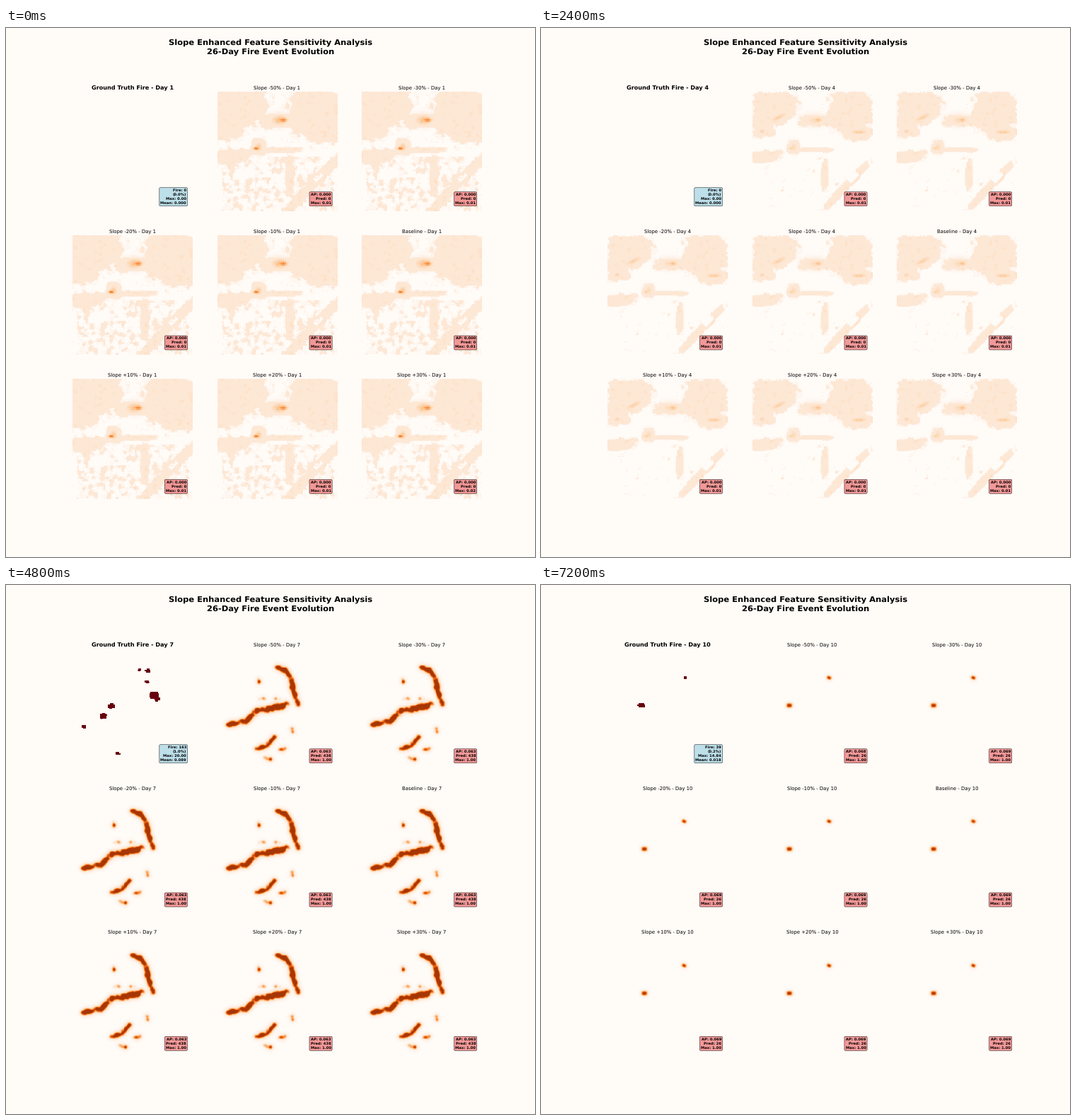
A matplotlib script that plays this animation: 748x748 px, repeating every 8 s.

```python
import matplotlib.pyplot as plt
import numpy as np
from matplotlib.animation import FuncAnimation
from matplotlib.colors import LinearSegmentedColormap, ListedColormap

plt.rcParams["font.family"] = "DejaVu Sans"
plt.rcParams["text.hinting"] = "none"

PAPER = "#fffbf7"
N = 128
SPAN = 169.4
DAYS = 10
rng = np.random.default_rng(7)
axis = (np.arange(N) + 0.5) * SPAN / N
X, Y = np.meshgrid(axis, axis)
COL, ROW = np.meshgrid(np.arange(N), np.arange(N))
DOTS = (COL % 2 == 0) & (ROW % 2 == 0)


def blur(a, n):
    a = np.asarray(a, float)
    for _ in range(n):
        p = np.pad(a, 1, mode="edge")
        a = (p[:-2, 1:-1] + p[2:, 1:-1] + p[1:-1, :-2] + p[1:-1, 2:] + 2 * a) / 6
    return a


def noise(n):
    a = blur(rng.standard_normal((N, N)), n)
    return a / a.std()


def union(*fields):
    return np.maximum.reduce(fields)


def spot(x, y, rx, ry=None, tilt=0, power=2):
    """Rounded bump that falls to one half at its radii."""
    t = np.radians(tilt)
    u = ((X - x) * np.cos(t) + (Y - y) * np.sin(t)) / rx
    v = ((Y - y) * np.cos(t) - (X - x) * np.sin(t)) / (ry or rx)
    return 0.5 ** (np.abs(u) ** power + np.abs(v) ** power)


def trail(radius, *points):
    """Band of even width along a polyline."""
    gap = np.full((N, N), np.inf)
    for (x0, y0), (x1, y1) in zip(points, points[1:]):
        dx, dy = x1 - x0, y1 - y0
        t = np.clip(((X - x0) * dx + (Y - y0) * dy) / (dx * dx + dy * dy), 0, 1)
        gap = np.minimum(gap, np.hypot(X - x0 - t * dx, Y - y0 - t * dy))
    return 0.5 ** ((gap / radius) ** 4)


def glow(field, reach, gain):
    return np.maximum(field, gain * blur(field, reach))


def cells(field, rough=0, cut=0.5):
    """Burning cells; roughness breaks the field into short dashes."""
    dash = noise(1) + 0.6 * noise(2)
    return (field + rough * dash * (field > 0.08) > cut).astype(float)


# Quiet days: one terrain whose risky part shrinks day by day
masses = [(32, 20, 31, 21, 0), (17, 48, 16, 18, 0), (44, 34, 22, 10, -38),
          (140, 28, 32, 32, 0), (92, 42, 28, 8, 0), (150, 60, 22, 11, 0),
          (18, 93, 22, 8, -8), (58, 79, 9, 10, 0), (88, 83, 26, 3.5, 0),
          (102, 118, 5, 22, 0), (134, 132, 46, 6, -46)]
land = union(*(spot(*mass, power=3) for mass in masses))
land *= 1 - spot(142, 122, 9, 4, -46, power=4)
terrain = land + 0.08 * noise(12) + 0.05 * noise(3)
scrub = noise(7)
south = (Y > 92) & (X > 6) & (X < 164)


def quiet(day):
    cut = min(0.5, 0.17 + 0.09 * day)
    soft = terrain + 0.03 * noise(3)
    inside = soft > cut
    shade = 0.14 + 0.035 * np.clip(noise(4) - 0.8, 0, 2)
    thin = 0.6 * day - 0.8
    fringe = DOTS & ((soft > cut - 0.13) | south & (scrub > thin))
    patch = south & (scrub > thin + 0.9)
    early, late = 5 - day, day - 1
    peaks = union(
        (0.72 - 0.08 * day) * spot(92, 41, 6, 3.5),
        (0.45 - 0.05 * day) * spot(88, 41, 11, 6.5),
        (0.24 + 0.13 * early) * spot(55, 81, 4, 2),
        (0.24 + 0.03 * early) * spot(58, 79, 5, 6),
        (0.2 + 0.04 * late) * spot(37, 37, 12, 3.5, -26),
        (0.2 + 0.05 * late) * spot(150, 58, 11, 3),
        (0.1 + 0.07 * late) * spot(14, 57, 4.5, 3))
    grain = 0.85 + 0.3 * DOTS + 0.05 * noise(1)
    return union(shade * (inside | patch), 0.12 * fringe, peaks * grain)


# Fire days: key paths of the burn
north = trail(3, (84, 27), (98, 33), (104, 45), (107, 60), (114, 80))
west = trail(4, (16, 108), (42, 102), (56, 88), (72, 86), (98, 80))
neck = trail(5.5, (78, 89), (79, 98))
streak = trail(3, (73, 148), (90, 130))
islet = spot(24, 108, 5.5, power=3)
body = spot(91, 58, 20, 28, power=3)

first_burn = union(
    spot(93, 58, 10, 27, power=6), 0.5 * spot(73, 55, 10, 20, power=4),
    0.42 * trail(3, (103, 45), (109, 72), (106, 118), (96, 154)),
    0.7 * trail(3, (91, 88), (75, 99)), 0.45 * trail(4, (84, 96), (82, 115)),
    0.8 * streak, spot(23, 108, 3.5, 2.8, power=4))
second_burn = union(
    north, 0.9 * west, 0.35 * trail(2, (60, 71), (90, 71)), 0.5 * spot(57, 48, 4, 5),
    0.95 * trail(3, (56, 142), (68, 138), (80, 126)), 0.6 * spot(91, 143, 4),
    0.7 * trail(2, (66, 155), (78, 157)), 0.5 * trail(2, (106, 110), (106, 121)))

spots = [(94, 31, 2.3), (106, 32, 3.4), (105, 48, 2.6), (115, 67, 6.5), (119, 72, 4),
         (55, 82, 4.6), (43, 96, 5.2), (16, 111, 3), (64, 149, 2.8)]


def embers(scale=1):
    return union(*(spot(x, y, r * scale, 0.75 * r * scale, power=3) for x, y, r in spots))


def smear(fire, gain):
    return glow(np.clip(blur(fire, 4) * gain, 0, 1), 12, 0.5)


flank = union(trail(7, (74, 40), (73, 44)), trail(6, (66, 46), (67, 47)),
              trail(6.5, (73, 54), (67, 66)), trail(4.5, (88, 35), (101, 36)))
cores = union(flank, neck, islet, 0.75 * spot(86, 98, 5, 4), 0.9 * spot(71, 81, 4, 3),
              0.95 * streak, 0.85 * spot(95, 129, 3.2), 0.6 * spot(95, 45, 14, 6))
haze = union(0.2 * body, 0.18 * spot(66, 27, 5, 6), 0.18 * spot(104, 112, 2, 10),
             0.17 * spot(101, 142, 8, 4, -30), 0.4 * body * DOTS)
crumbs = union(*(spot(*p, 2.2, 1.6) for p in rng.uniform((52, 122), (90, 148), (8, 2))))
link = trail(1.8, (86, 25), (94, 31), (104, 36), (105, 50), (113, 64))
last = union(spot(52, 81, 3.6, 2.7, power=3), 0.9 * spot(108, 42, 3, 2.3, 25, power=3))

truth = {
    5: cells(first_burn, 0.16),
    6: cells(second_burn, 0.22, 0.62),
    7: cells(embers(), 0.05),
    8: cells(embers(0.5)),
    9: cells(last),
    10: cells(union(spot(48, 81, 5.5, 2.6, power=3), spot(109, 42, 2, power=3))),
}
predicted = {day: quiet(day) for day in range(1, 6)}
predicted[6] = union(glow(cores, 10, 0.5) * (1 - 0.12 * DOTS), haze)
predicted[7] = smear(truth[6], 1.5)
predicted[8] = union(glow(embers(), 8, 0.45), 0.27 * link, 0.2 * crumbs,
                     0.28 * spot(37, 109, 5, 1.4), 0.35 * spot(84, 124, 2.4))
predicted[9] = smear(truth[8], 1.8)
predicted[10] = glow(last, 8, 0.5)

# Captions
SLOPES = ["Slope -50%", "Slope -30%", "Slope -20%", "Slope -10%", "Baseline",
          "Slope +10%", "Slope +20%", "Slope +30%"]
FIRE = {5: (1348, 8.2, 20, 1.024), 6: (766, 4.7, 20, 0.428), 7: (163, 1.0, 20, 0.089),
        8: (37, 0.2, 21, 0.017), 9: (28, 0.2, 15.5, 0.014), 10: (39, 0.2, 14.84, 0.018)}
# First score, panel where it gains a thousandth
SCORE = {5: (0.013, 5), 6: (0.061, 4), 7: (0.063, 8), 8: (0.065, 8), 9: (0.067, 8),
         10: (0.068, 1)}
COUNT = {6: [906, 904, 906, 910, 911, 911, 908, 907], 7: [438] * 8,
         8: [156, 156, 155] + [153] * 5, 9: [31] * 8, 10: [26] * 8}


def truth_label(day):
    values = FIRE.get(day, (0, 0, 0, 0))
    return "Fire: {}\n({:.1f}%)\nMax: {:.2f}\nMean: {:.3f}".format(*values)


def risk_label(day, i):
    score, step = SCORE.get(day, (0, 8))
    count = COUNT.get(day, [0] * 8)[i]
    top = 1.0 if day > 5 else 0.02 if (day, i) == (1, 7) else 0.01
    return f"AP: {score + 0.001 * (i >= step):.3f}\nPred: {count}\nMax: {top:.2f}"


heat = LinearSegmentedColormap.from_list("heat", [
    (0, PAPER), (0.13, "#fee9d8"), (0.28, "#fdd6b0"), (0.43, "#fdb475"),
    (0.58, "#f88b3b"), (0.73, "#e86412"), (0.88, "#c04205"), (1, "#a63603")])
char = ListedColormap([PAPER, "#67000d"])

fig, grid = plt.subplots(3, 3, figsize=(18, 18), dpi=748 / 18, facecolor=PAPER)
fig.suptitle("Slope Enhanced Feature Sensitivity Analysis\n26-Day Fire Event Evolution",
             fontsize=20, fontweight="bold", linespacing=1.27)


def panel(ax, cmap, color, interpolation):
    ax.axis("off")
    image = ax.imshow(np.zeros((N, N)), cmap=cmap, vmin=0, vmax=1,
                      interpolation=interpolation)
    note = ax.text(0.95, 0.053, "", transform=ax.transAxes, ha="right", va="bottom",
                   fontsize=9, fontweight="bold", linespacing=1.31,
                   bbox=dict(boxstyle="round,pad=0.3", facecolor=color, alpha=0.8))
    return ax, image, note


first, *rest = grid.ravel()
observed = panel(first, char, "lightblue", "nearest")
forecasts = [panel(ax, heat, "lightcoral", "antialiased") for ax in rest]


def draw(frame):
    day = frame + 1
    ax, image, note = observed
    ax.set_title(f"Ground Truth Fire - Day {day}", fontsize=14, fontweight="bold")
    image.set_data(truth.get(day, np.zeros((N, N))))
    note.set_text(truth_label(day))
    for i, (ax, image, note) in enumerate(forecasts):
        ax.set_title(f"{SLOPES[i]} - Day {day}", fontsize=12)
        image.set_data(np.clip(predicted[day], 0, 1))
        note.set_text(risk_label(day, i))
    return []


anim = FuncAnimation(fig, draw, frames=DAYS, interval=800, repeat=True, repeat_delay=0)
plt.show()
```
